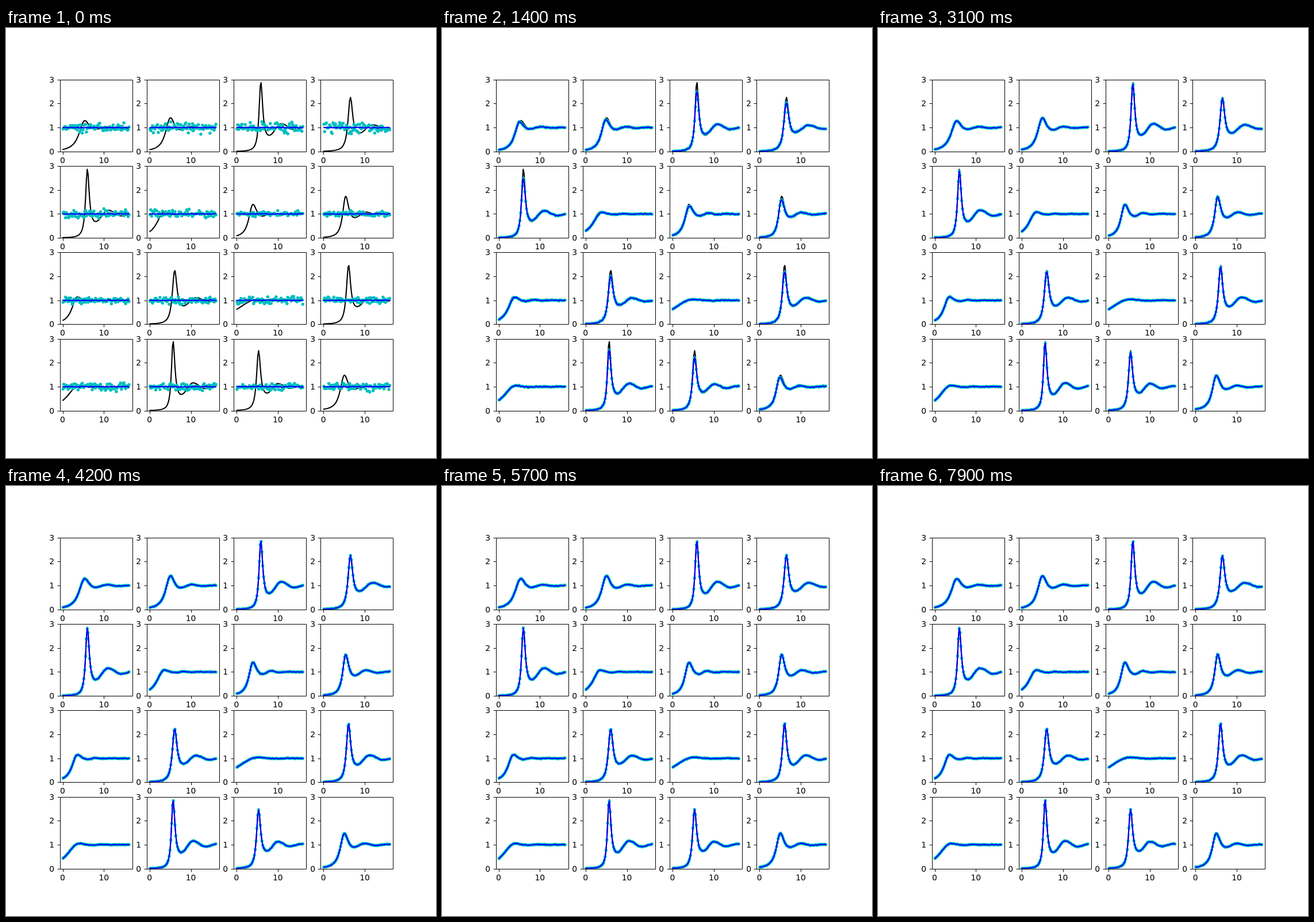
These frames come from a looping animation (748 px wide and 748 px high, 8000 ms). An HTML page:

```html
<!DOCTYPE html>
<html lang="en">
<head>
<meta charset="utf-8">
<title>Curve fitting grid</title>
<style>
  html, body { margin: 0; width: 100%; height: 100%; overflow: hidden; background: #fff; }
  svg { display: block; }
  text { font: 13.89px "DejaVu Sans", sans-serif; fill: #000; }
  path { fill: none; stroke-linejoin: round; }
  .axis { stroke: #000; stroke-width: 1; }
  .goal, .fit { stroke-width: 2.08; stroke-linecap: square; }
  .goal { stroke: #000; }
  .fit { stroke: #00f; }
  .dots { stroke: #00bfbf; stroke-width: 5.5; stroke-linecap: round; }
</style>
</head>
<body>
<svg id="stage" width="748" height="748" viewBox="0 0 748 748"></svg>
<script>
const STEP = 100, STEPS = 80, COUNT = 80;
const W = 126.02, H = 125.21, UNIT_X = 7.18, UNIT_Y = H / 3, ZERO_X = 5.01;

// start value, peak position and peak height of each curve
const goals = [
  [.09, 5.4, 1.29], [.08, 5.1, 1.41], [.013, 5.9, 2.9], [.016, 6.55, 2.26],
  [.013, 6, 2.87], [.26, 3.6, 1.08], [.09, 4, 1.4], [.03, 5.4, 1.74],
  [.16, 3.6, 1.15], [.018, 6.1, 2.25], [.62, 5.3, 1.04], [.016, 6.1, 2.47],
  [.42, 4, 1.05], [.012, 5.7, 2.9], [.018, 5.35, 2.5], [.06, 5.1, 1.48]
];

const clamp = v => Math.min(1, Math.max(0, v));

function random(seed) {
  return () => {
    seed = seed + 0x6D2B79F5 | 0;
    let v = Math.imul(seed ^ seed >>> 15, 1 | seed);
    v = v + Math.imul(v ^ v >>> 7, 61 | v) ^ v;
    return ((v ^ v >>> 14) >>> 0) / 4294967296;
  };
}

// roughly normal, mean 0 and deviation 1
const normal = rnd => (rnd() + rnd() + rnd() + rnd() - 2) * 1.73;

const RISE = 2.2;
const halfWidth = ([start, peak, height]) => peak / (height / start - 1) ** (1 / RISE);

// a peak that falls into a trough, then damped ripples around 1
function curve(peak, height, width) {
  const trough = peak + 1.75 + .5 * width;
  const dip = .19 * Math.max(0, height - 1) ** .82;
  const tail = .27 + .1 * (2.9 - height) ** 2;
  return x => {
    if (x < peak) return height / (1 + ((peak - x) / width) ** RISE);
    if (x < trough) {
      const u = (x - peak) / (trough - peak);
      return 1 - dip + (height - 1 + dip) * (1 - u * u) ** 2 / (1 + (u / tail) ** 2);
    }
    let from = trough, span = peak / 2, amp = -dip;
    while (x > from + span) {
      from += span;
      span *= 1.05;
      amp *= -.5;
    }
    const u = (1 - Math.cos(Math.PI * (x - from) / span)) / 2;
    return 1 + amp * (1 - 1.5 * u);
  };
}

const xs = Array.from({ length: COUNT }, (_, i) => .1 + .202 * i);
const point = (x, y) => (ZERO_X + x * UNIT_X).toFixed(2) + " " + (H - y * UNIT_Y).toFixed(2);
const line = ys => "M" + ys.map((y, i) => point(xs[i], y)).join("L");
const spots = ys => ys.map((y, i) => "M" + point(xs[i], y) + "h0").join("");

function add(parent, tag, attrs, text) {
  const el = document.createElementNS("http://www.w3.org/2000/svg", tag);
  for (const key in attrs) el.setAttribute(key, attrs[key]);
  if (text !== undefined) el.textContent = text;
  parent.appendChild(el);
  return el;
}

const snap = v => Math.floor(v + .5) + .5;
const stage = document.getElementById("stage");

const panels = goals.map((goal, k) => {
  const left = 93.5 + (k % 4) * 151.226;
  const top = 89.76 + Math.floor(k / 4) * 150.25;
  const bottom = top + H;
  const plot = add(stage, "svg", { x: left, y: top, width: W, height: H, overflow: "hidden" });
  const width = halfWidth(goal);
  add(plot, "path", { class: "goal", d: line(xs.map(curve(goal[1], goal[2], width))) });
  const dots = add(plot, "path", { class: "dots" });
  const fit = add(plot, "path", { class: "fit" });

  const l = snap(left), r = snap(left + W), t = snap(top), b = snap(bottom);
  let axis = `M${l} ${t}H${r}V${b}H${l}Z`;
  for (const v of [0, 10]) {
    const x = left + ZERO_X + v * UNIT_X;
    axis += `M${snap(x)} ${b}v4.86`;
    add(stage, "text", { x, y: Math.round(bottom + 20), "text-anchor": "middle" }, v);
  }
  for (let v = 0; v < 4; v++) {
    const y = bottom - v * UNIT_Y;
    axis += `M${l} ${snap(y)}h-4.86`;
    add(stage, "text", { x: Math.round(left - 9.5), y: Math.round(y + 5), "text-anchor": "end" }, v);
  }
  add(stage, "path", { class: "axis", d: axis });
  const scatter = .04 + .07 * random(k + 1)();
  return { goal, width, scatter, dots, fit };
});

function fitted({ goal, width }, t, rnd) {
  const [, peak, height] = goal;
  const rise = height - 1;
  const raw = 1 - clamp((t - .8) / 1.2);
  const learnt = 1 - (1 - clamp(t / .8)) ** 2;

  // tall peaks are reached late; low ones first sit near a shared position
  const lag = .02 + .36 * Math.exp(-Math.max(0, t - .8) / .8);
  const top = height - rise * (lag + .006 * normal(rnd));
  const shift = .8 * (4.5 - peak) * Math.exp(-((1.6 * rise) ** 2)) * raw;
  const shape = curve(peak + shift, top, (width + shift) * (height / top) ** .6);

  const rough = .005 + .006 * raw;
  return xs.map(x => {
    const noise = normal(rnd) * rough * (x < 3 ? .4 : 1);
    return 1 + (shape(x) - 1) * learnt + noise;
  });
}

function draw(step) {
  panels.forEach((panel, k) => {
    const rnd = random(step * 977 + k * 7919 + 5);
    const ys = fitted(panel, step * STEP / 1000, rnd);
    const spread = panel.scatter * Math.exp(-step / 1.8) + .004;
    panel.fit.setAttribute("d", line(ys));
    panel.dots.setAttribute("d", spots(ys.map(y => y + spread * normal(rnd))));
  });
}

const began = performance.now();
let shown = -1;
function tick() {
  const step = Math.floor((performance.now() - began) / STEP) % STEPS;
  if (step !== shown) draw(shown = step);
  requestAnimationFrame(tick);
}
tick();
</script>
</body>
</html>
```
